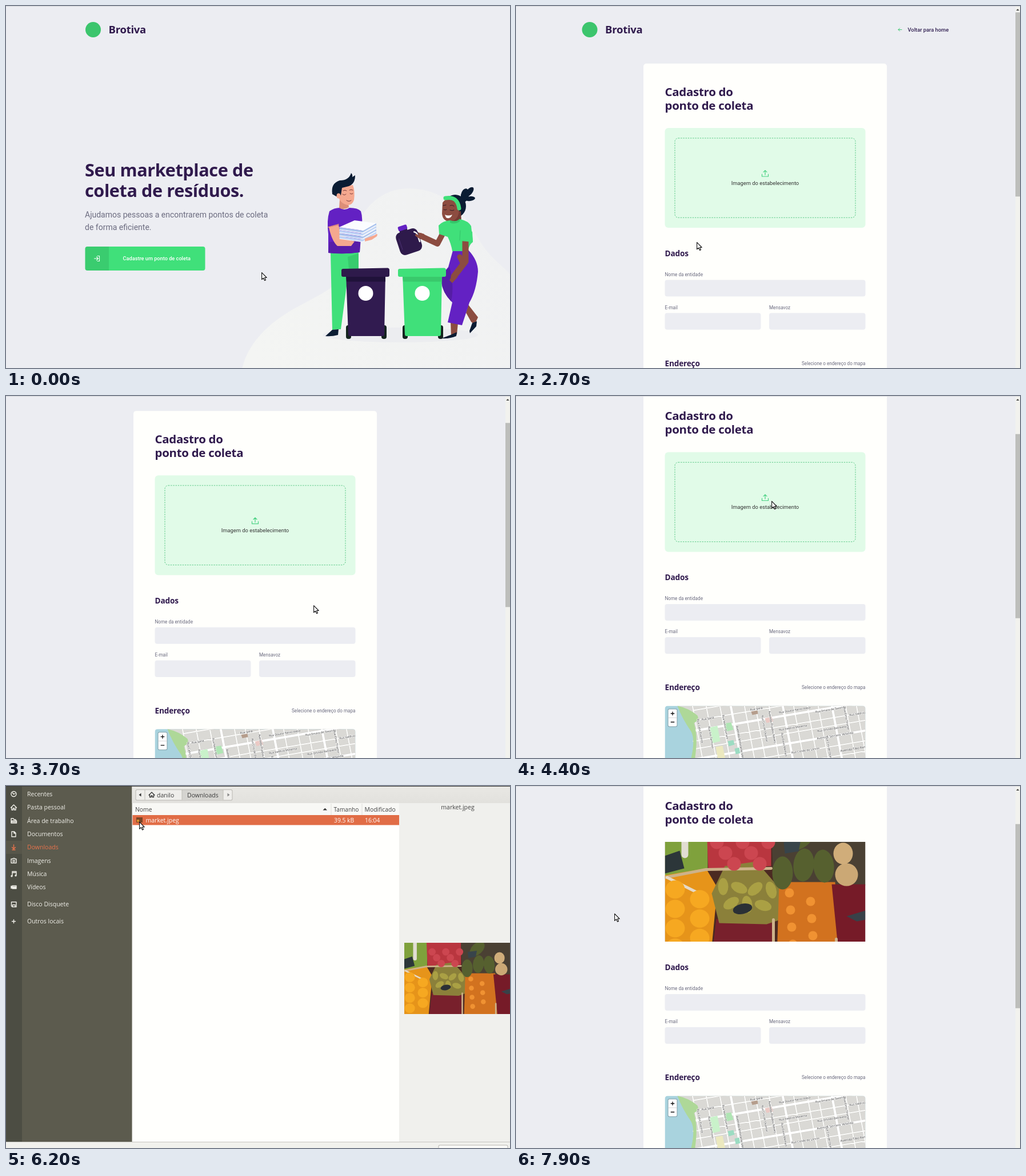
An HTML page with a canvas for the animation above (8000 ms loop, 882 px wide and 635 px high).

```html
<!DOCTYPE html>
<html lang="pt-BR">
<head>
<meta charset="utf-8">
<title>Ponto de coleta</title>
<style>
html, body { margin: 0; width: 100%; height: 100%; overflow: hidden; background: #ecedf2; }
canvas { display: block; width: 882px; height: 635px; }
</style>
</head>
<body>
<canvas id="stage" width="882" height="635"></canvas>
<script>
const W = 882, H = 635, LOOP = 8000;
const g = document.getElementById('stage').getContext('2d');
const BG = '#ecedf2', INK = '#2e1a4b', GREEN = '#40e07a', PURPLE = '#6321c3';
const NAVY = '#0b1c33', PEACH = '#f5a88f', BROWN = '#8c4c40', GREY = '#6c6c80', BRAND = 'Brotiva';
const roboto = (size, weight = 400) => `${weight} ${size}px Roboto, sans-serif`;
const ui = size => `${size}px "Open Sans", sans-serif`;

function fill(d, color) { g.fillStyle = color; g.fill(new Path2D(d)); }
function line(d, color, width = 1) {
  g.strokeStyle = color; g.lineWidth = width;
  g.lineCap = g.lineJoin = 'round';
  g.stroke(new Path2D(d));
}
function box(x, y, w, h, color, r = 0) {
  g.beginPath(); g.roundRect(x, y, w, h, r);
  g.fillStyle = color; g.fill();
}
function oval(x, y, rx, ry, color, turn = 0) {
  g.beginPath(); g.ellipse(x, y, rx, ry, turn, 0, 7);
  g.fillStyle = color; g.fill();
}
function text(s, x, y, font, color, align = 'left') {
  g.font = font; g.fillStyle = color; g.textAlign = align;
  g.fillText(s, x, y);
}
function title(s, x, y, size) {
  g.letterSpacing = -size * .0126 + 'px';
  text(s, x, y - .4, `700 ${size * .973}px "Open Sans", sans-serif`, '#301a4d');
  g.letterSpacing = '0px';
}
function at(x, y, draw) { g.save(); g.translate(x, y); draw(); g.restore(); }
function clip(w, h, r = 0) { g.beginPath(); g.roundRect(0, 0, w, h, r); g.clip(); }
const smooth = p => { p = Math.min(1, Math.max(0, p)); return p * p * (3 - 2 * p); };

function brand(x, y) {
  oval(x + 14, y, 13.5, 13.5, '#3cc56d');
  title(BRAND, x + 41, y + 7.3, 19);
}

function bin(x, body, lid, shade) {
  box(x + 8, 560, 9, 24, '#14231f', 4);
  box(x + 70, 560, 9, 24, '#14231f', 4);
  fill(`M${x + 8} 470H${x + 77}L${x + 75} 576Q${x + 75} 579 ${x + 72} 579H${x + 15}Q${x + 12} 579 ${x + 12} 576Z`, body);
  fill(`M${x + 8} 474H${x + 77}V483.5H${x + 9}Z`, shade);
  fill(`M${x + 3} 461L${x + 81} 459.5Q${x + 84} 460 ${x + 84} 463V472Q${x + 84} 475 ${x + 81} 475H${x + 3}Q${x} 475 ${x} 472V464Q${x} 461 ${x + 3} 461Z`, lid);
  oval(x + 42.5, 504, 13, 13, '#fff');
}

function man() {
  fill('M568 432L617 431L616 464L598 476L586 567L571 568Z', GREEN);
  fill('M598 440L617 434V462H600Z', '#38cc6e');
  fill('M559 579L571 568L582 567L581 577Q570 580 559 579Z', NAVY);
  fill('M566 360Q574 354 584 354Q592 360 601 354Q616 354 621 360Q625 372 622 396L619 432Q592 436 564 433V400Q561 376 566 360Z', PURPLE);
  fill('M566 414L620 409L619 432Q592 436 564 433Z', '#571da8');
  fill('M584 340L599 345L600 353Q591 359 583 354Z', '#dd8f78');
  fill('M581 318L607 314Q611 325 609 340Q606 350 597 349Q584 346 581 332Z', PEACH);
  fill('M571 330Q568 311 584 306Q600 306 604 293Q607 296 606 300L611 297Q611 312 600 316L588 319L586 332L578 334Z', NAVY);
  oval(582, 333, 3.5, 4.5, PEACH);
  line('M589 330q3 3 6 0M602 329q3 2 5 0M596 341q4 3 8 0M590 324q3-2 6 0M601 323q3-2 6 0', '#7a3b3a', 1);
  fill('M565 388L582 384L585 398L600 410L610 413L604 421L580 421Q570 412 565 388Z', PEACH);
  line('M564 388L582 383', '#e58d77', 1.5);
  for (let i = 3; i >= 0; i--) {
    const y = 388 + i * 5.2;
    fill(`M583 ${y}L625 ${y + 6}L648 ${y - 7}V${y - 3}L624 ${y + 10.5}L584 ${y + 4.5}Z`, i % 2 ? '#bed2f5' : '#a9c2ec');
    line(`M584 ${y + 4.5}L624 ${y + 10}L647 ${y - 3}`, '#f3f7ff', 1.4);
  }
  fill('M583 388L610 376L648 381L625 394Z', '#fbfcff');
  fill('M628 408L645 402Q652 397 649 404L640 410L628 413Z', PEACH);
}

function jug() {
  at(705, 413, () => {
    g.rotate(-.32);
    box(-20, -20, 40, 41, INK, 9);
    box(-10, -25, 14, 8, INK, 2);
    box(-11, -30, 16, 8, PURPLE, 2);
    line('M14 -13Q18 -11 18 -6V6', '#f2f3f2', 2.4);
    line('M-15 -10V10', '#4a2f70', 1);
  });
}

function woman() {
  fill('M809 524L826 546L820 559L814 554L805 538Z', BROWN);
  fill('M778 552L791 556L789 576L779 580Z', BROWN);
  fill('M824 553L823 562L812 574L811 570L816 556Z', NAVY);
  fill('M762 583L778 577L789 572L788 579Q777 584 762 583Z', NAVY);
  fill('M782 429L809 428Q826 446 826 466Q823 500 811 520L798 560L773 555L781 520Q764 503 762 484Q762 470 774 458Z', PURPLE);
  fill('M776 458Q785 490 779 518Q764 503 762 484Q762 470 776 458Z', '#551da5');
  line('M766 396L755 417L725 403', BROWN, 10);
  fill('M732 400L721 397L717 401L723 409L732 408Z', BROWN);
  oval(803, 332, 7, 12, NAVY, .2);
  oval(811, 326, 5, 10, NAVY, .7);
  oval(812, 338, 4, 9, NAVY, 1.45);
  oval(786, 351, 19, 20, NAVY);
  fill('M777 360L796 360L797 380Q786 385 777 378Z', '#733a33');
  fill('M764 345Q770 336 781 338Q793 344 793 358Q792 377 776 378Q764 377 763 364Z', BROWN);
  line('M769 337Q790 333 793 355', GREEN, 7);
  fill('M768 366Q774 369 781 366Q777 375 770 371Z', '#fff');
  line('M766 357q3 2 5 0M777 358q4 2 7 0M765 350l5-1M777 350q4-2 7 1', '#321b24', 1);
  fill('M757 385Q764 377 777 376Q788 380 795 374Q809 377 814 386L817 414Q811 418 808 430H781Q779 417 773 405L758 400Z', GREEN);
  fill('M777 376Q788 380 794 373L794 378Q785 384 777 380Z', '#34c56a');
  line('M804 413L804 448L784 474', BROWN, 11);
  fill('M786 464L776 481L781 486L790 476Z', BROWN);
  fill('M795 391Q806 388 816 396L817 414L795 412Z', GREEN);
  line('M795 394L794 411', '#34c56a', 1);
}

function home(hover) {
  box(0, 0, W, H, BG);
  const soft = g.createLinearGradient(430, 600, 860, 380);
  soft.addColorStop(0, '#f4f5f3');
  soft.addColorStop(1, '#f0f1f2');
  fill('M413 636C426 585 466 551 515 525C570 496 601 481 603 433C606 375 645 319 706 320C772 321 803 365 828 410C847 443 870 455 883 472V636Z', soft);
  oval(690, 577, 136, 13, '#ecedf0');
  brand(138.5, 41.5);
  title('Seu marketplace de', 138, 299, 31.5);
  title('coleta de resíduos.', 138, 335, 31.5);
  text('Ajudamos pessoas a encontrarem pontos de coleta', 138, 371, roboto(14), GREY);
  text('de forma eficiente.', 138, 392.5, roboto(14), GREY);
  const mix = (a, b) => Math.round(a + (b - a) * hover);
  box(138.5, 422, 210, 42, `rgb(${mix(64, 56)},${mix(224, 204)},${mix(122, 108)})`, 4);
  box(138.5, 422, 41.5, 42, 'rgba(0,0,0,.09)', [4, 0, 0, 4]);
  line('M154.5 443H161M158.5 440.2L161.3 443L158.5 445.8M160 438.5H163.5V447.5H160', '#fff', 1.1);
  text('Cadastre um ponto de coleta', 204.5, 446.4, roboto(9.2, 500), '#fff');
  man();
  bin(587, '#311b50', INK, '#20123a');
  woman();
  bin(686, GREEN, GREEN, '#39c96c');
  line('M794 440L800 452L783 476', BROWN, 9);
  jug();
  line('M718 402L724 406', BROWN, 4);
  box(0, 0, W, 1, '#d6d7db');
}

// Flat stand-in for the market picture, drawn in a 351 by 234 box.
function picture() {
  clip(351, 234);
  box(0, 0, 351, 234, '#4b2a22');
  fill('M0 0H75V80L0 95Z', '#7fa13c');
  fill('M73 0H186V72L76 78Z', '#b9363f');
  fill('M186 0H351V106H190Z', '#4a4033');
  fill('M0 88L72 76L92 110L80 234H0Z', '#e6941a');
  fill('M90 165H192V234H82Z', '#78202c');
  fill('M82 120L105 72L160 64L200 110L205 165L178 174L95 172Z', '#8b803a');
  fill('M200 100L298 100L306 234H196Z', '#d2721f');
  fill('M292 104H351V234H305Z', '#761b28');
  line('M0 92L72 78L186 76M190 166V234M300 200V234', '#cdb28a', 5);
  line('M4 92L60 120', '#e5dac8', 5);
  for (const [x, y, turn] of [[206, 84, 0], [243, 70, .1], [278, 72, -.1], [239, 20, .8]])
    oval(x, y, 18, 29, '#56602f', turn);
  oval(318, 87, 20, 20, '#cba875');
  oval(312, 50, 17, 19, '#d0ad7a');
  for (let i = 0; i < 7; i++) {
    oval(18 + i % 2 * 43, 113 + i * 17, 17, 16, '#f6a821');
    oval(102 + i * 14, 108 + (i * 29) % 56, 9, 15, '#aaa044', i);
    oval(218 + (i * 37) % 72, 119 + i * 15, 8, 8, '#f09232');
    oval(91 + i * 15, 30 + (i % 3) * 19, 12, 12, '#cc4650');
  }
  fill('M0 54L26 45L34 76L0 85Z', '#2c3639');
  fill('M208 30L238 26L234 46L210 50Z', '#38444a');
  oval(136, 147, 17, 9, '#2b3035', -.2);
  fill('M318 160L351 150V166L336 169Z', '#384148');
  line('M35 0V52', '#e1ddd2', 12);
}

const streets = [
  ['Rua Ipelã', 75, 22], ['Rua Ipelã', 160, 5], ['Rua Doutor Nério Valpa', 227, 7],
  ['Rua Ilmaro de Tavonde', 290, 6], ['Rua Valdirio Morenta', 347, 12],
  ['Rua Valdirio Morenta', 224, 38], ['Rua Orlindo Batravela', 292, 40],
  ['Avenida Serrano Velonda', 298, 52], ['Rua Conde de Larvim', 246, 78],
  ['Avenida Tibo Ranes', 332, 75], ['Rua Cabo Evarinte', 62, 44, 1],
  ['Rua Ivo Tarmosa', 81, 55, 1], ['Rua Nelvo Quirant', 106, 37, 1],
  ['Avenida Almirante Vero', 132, 65, 1], ['Rua Ciro de Ovantar', 175, 40, 1],
  ['Avenida Prados Neves', 188, 37, 1], ['Rua Davo Melhart', 209, 68, 1],
  ['Rua Ciro de Ovantar', 288, 76, 1], ['Rua Elmo Tirante', 318, 22, 1]
];

function map() {
  clip(351, 180, 5);
  box(0, 0, 351, 180, '#a9d3de');
  fill('M22 0Q34 24 48 40Q56 62 46 100V180H351V0Z', '#dad9d5');
  let roads = '', mains = '';
  for (let i = 0; i < 15; i++) {
    const x = 46 + i * 22 + (i * 7) % 5, part = `M${x} -12L${x + 27} 130`;
    if (i % 4 == 3) mains += part; else roads += part;
  }
  for (let i = 0; i < 9; i++) {
    const y = 8 + i * 17 + (i * 5) % 4, part = `M50 ${y}L365 ${y - 53}`;
    if (i % 3 == 2) mains += part; else roads += part;
  }
  line(roads, '#cccbc7', 2.8); line(mains, '#c8c7c3', 4.8);
  line(roads, '#fcfcfa', 2); line(mains, '#fff', 4);
  fill('M78 38L92 35L97 62L82 66Z', '#c9f2ca');
  fill('M104 31L116 29L120 42L107 45Z', '#b0e5b4');
  fill('M110 62L120 60L122 68L112 71ZM122 75L130 73L132 83L124 85Z', '#9cdcc2');
  fill('M89 72L101 70L106 94H93Z', '#ece9bf');
  fill('M151 10L162 8L163 14L153 16Z', '#b59d8c');
  fill('M175 22L187 19L190 27L178 30Z', '#ebc9c4');
  fill('M22 0Q42 4 57 17Q61 25 51 30Q59 55 52 96H45Q54 60 46 45Q30 22 22 0Z', '#aed898');
  for (const [name, x, y, down] of streets) at(x, y, () => {
    g.rotate(down ? 1.39 : -.165);
    g.font = `${name[0] == 'A' ? 5.5 : 5}px "Noto Sans", sans-serif`;
    g.textAlign = 'center';
    g.strokeStyle = 'rgba(255,255,255,.8)'; g.lineWidth = 1.3;
    g.strokeText(name, 0, 2);
    g.fillStyle = '#3b3b3b'; g.fillText(name, 0, 2);
  });
  box(5, 5, 17, 32, 'rgba(0,0,0,.25)', 3);
  box(6, 6, 15, 30, '#fff', 2);
  box(6, 20.5, 15, .8, '#ccc');
  line('M10.7 13.5H16.3M13.5 10.7V16.3M10.7 28.5H16.3', '#111', 1.3);
}

function form(scroll, chosen) {
  box(0, 0, W, H, BG);
  at(0, -scroll, () => {
    brand(115, 41.5);
    line('M669 41.5H675M671.5 39L669 41.5L671.5 44', '#40c973', 1);
    text('Voltar para home', 685.5, 44.5, roboto(9.33, 500), '#322153');
    box(223, 101, 426, 900, '#fffffc', 5);
    title('Cadastro do', 260.5, 158, 21);
    title('ponto de coleta', 260.5, 182, 21);
    if (chosen) at(260.5, 213.5, () => {
      clip(351, 175);
      g.translate(0, -29.5);
      picture();
    });
    else {
      box(260.5, 214, 351, 175, '#e1fbe8', 6);
      g.setLineDash([2.4, 1.8]);
      g.beginPath(); g.roundRect(278, 231.8, 316, 139.4, 6);
      g.strokeStyle = '#5cc987'; g.lineWidth = 1; g.lineCap = 'butt'; g.stroke();
      g.setLineDash([]);
      line('M430.5 295V299H441.5V295M436 296V288.5M433 291.3L436 288.3L439 291.3', '#4bd284', 1.2);
      text('Imagem do estabelecimento', 436, 313.7, roboto(9.33), '#333', 'center');
    }
    const label = (s, x, y, align) => text(s, x, y, roboto(8.17), GREY, align);
    title('Dados', 260.5, 439, 14);
    label('Nome da entidade', 260.5, 473.5);
    box(260.5, 480.5, 351, 29, BG, 4);
    label('E-mail', 260.5, 531.7);
    label('Mensavoz', 443, 531.7);
    box(260.5, 538.5, 168, 29.3, BG, 4);
    box(443, 538.5, 168.5, 29.3, BG, 4);
    title('Endereço', 260.5, 632, 14);
    label('Selecione o endereço do mapa', 611.5, 629.7, 'right');
    at(260.5, 659, map);
  });
  box(874, 0, 8, H, '#f2f2ee');
  box(874, 11.2 + scroll * .48, 8, 323, '#bdbebb');
  fill('M875.3 8L878 5L880.7 8Z', '#444');
  box(0, 0, W, 1, '#d6d7db');
}

const places = [
  ['Recentes', 14, 'M9 14a4.5 4.5 0 1 0 9 0a4.5 4.5 0 1 0 -9 0M11.5 12L13.5 14.5L16 13'],
  ['Pasta pessoal', 37.5, 'M8.5 38L13.5 33L18.5 38M10 37V42H12.5V39H14.5V42H17V37'],
  ['Área de trabalho', 61, 'M9 65V57H13L14 59H17V61M9 65L10.5 61H18.5V65ZM11 63H18'],
  ['Documentos', 84.5, 'M10 80H14.5L17 82.5V89H10ZM14 80V83H17'],
  ['Downloads', 107.5, 'M13.5 103V110M10.5 107.5L13.5 110.5L16.5 107.5M11 112H16'],
  ['Imagens', 131, 'M9 128H11.5L12.5 127H15L16 128H18V135H9ZM12 131.5a1.6 1.6 0 1 0 3.2 0a1.6 1.6 0 1 0 -3.2 0'],
  ['Música', 154, 'M11 158V150H18V157M11 152H18M9 158a1 1 0 1 0 2 0a1 1 0 1 0 -2 0M16 157a1 1 0 1 0 2 0a1 1 0 1 0 -2 0'],
  ['Vídeos', 177.5, 'M11 175H18V180H11ZM9 175.5L11 177.5L9 179.5ZM12 177H17M12 178.5H17'],
  ['Disco Disquete', 207.5, 'M9.5 203.5H18V212H11L9.5 210.5ZM11.5 212V208.5H16V212'],
  ['Outros locais', 237.5, 'M10.5 237.5H16.5M13.5 234.5V240.5']
];

function dialog() {
  box(0, 0, W, H, '#f0f0ed');
  box(0, 0, 220.5, 625, '#5c5b4e');
  box(0, 0, 28, 625, '#4c4d43');
  box(0, 96, 28, 23, '#57564a');
  for (const [name, y, icon] of places) {
    const color = name == 'Downloads' ? '#e8734c' : '#f1f0ea';
    line(icon, color, 1.4);
    text(name, 37, y + 3.8, ui(10.5), color);
  }
  const bar = g.createLinearGradient(0, 0, 0, 30);
  bar.addColorStop(0, '#e9e8e4');
  bar.addColorStop(1, '#e2e1dd');
  box(220.5, 0, 661.5, 30, bar);
  box(226.5, 6, 170, 19.5, '#b9b7b2', 3);
  box(227.5, 7, 168, 17.5, '#efeeeb', 2);
  box(308, 7, 72, 17.5, '#d5d4d0');
  for (const x of [243, 308, 380]) box(x - .5, 7, 1, 17.5, '#bfbdb8');
  fill('M236.5 12.5V18.5L232.5 15.5Z', '#333');
  fill('M387.5 12.5V18.5L391.5 15.5Z', '#888');
  line('M250 16L255 11L260 16M251.5 15.5V19.5H254V17H256V19.5H258.5V15.5', '#333', 1.3);
  text('danilo', 264, 19.5, ui(10.5), '#3c3c3c');
  text('Downloads', 317, 19.5, ui(10.5), '#3c3c3c');
  box(221.5, 30, 466.5, 21, '#f8f8f5');
  box(221.5, 51, 466.5, 573, '#fffffd');
  for (const x of [568.5, 622.5]) box(x, 31, 1, 20, '#deddd9');
  fill('M554.5 42.5L558.3 38.8L562 42.5Z', '#333');
  text('Nome', 226, 44.6, ui(10.4), '#444');
  text('Tamanho', 573.5, 44.6, ui(10.1), '#444');
  text('Modificado', 627.5, 44.6, ui(10.4), '#444');
  box(221.5, 51, 466.5, 17.5, '#e16d46');
  box(228, 55, 11, 9, '#7a4526');
  box(229, 59, 4, 4, '#d9902b');
  text('market.jpeg', 244.5, 63.6, ui(10.5), '#fff');
  text('39.5 kB', 574, 63.6, ui(10.3), '#fff');
  text('16:04', 628, 63.6, ui(10.3), '#fff');
  text('market.jpeg', 790.5, 41, ui(10.5), '#444', 'center');
  at(697, 275, () => { g.scale(.534, .534); picture(); });
  box(0, 624, W, 1, '#c6c5c0');
  box(0, 625, W, 10, '#f1f1ed');
  box(756.5, 629.5, 122, 20, '#b9b7b2', 3);
  box(757.5, 630.5, 120, 20, '#fafaf8', 2);
  box(0, 0, W, 1, '#3c3b37');
}

// The dialog folded almost flat, thinning towards the right.
function sliver() {
  const band = g.createLinearGradient(0, 0, W, 0);
  [[0, '#3b3a36'], [.14, '#66655c'], [.33, '#f3f2ec'], [.78, '#fffffc'], [1, '#94765c']]
    .forEach(([p, color]) => band.addColorStop(p, color));
  fill('M0 315.5H620L882 317V319L620 320.5H0Z', band);
  box(0, 315.5, W, .9, 'rgba(84,54,36,.7)');
}

// Pointer stops: time, x, y. Each holds until the next.
const stops = [
  [0, 447, 467], [800, 430, 463], [900, 390, 453], [1100, 364, 449], [1200, 328, 442],
  [1300, 306, 437], [1400, 301, 435.5], [2000, 300, 430], [2700, 316, 414], [2900, 373, 392],
  [3100, 475, 376], [3300, 538, 367], [3900, 526, 342], [4000, 500, 288], [4100, 468, 222],
  [4200, 459, 205], [4300, 451, 191], [4400, 447, 184], [5300, 422, 178], [5400, 644, 419],
  [5600, 730, 501], [5800, 390, 184], [6000, 285, 94], [6200, 233, 62.5]
];

function pointer(t) {
  let [, x, y] = stops.findLast(s => s[0] <= t);
  const drift = smooth((t - 7300) / 600);
  x += -61 * drift; y += 161 * drift;
  at(x, y, () => {
    if (t >= 1200 && t < 2000) {
      const hand = 'M-1 1Q0 -1 1.5 1V5L6 6Q8.5 6.5 8 9L7 13.5H0L-4.5 8.5Q-4.5 6.5 -2 7.5L-1 8.5Z';
      fill(hand, '#fff'); line(hand, '#111', 1.1);
      line('M2 9V11.5M4.2 9V11.5', '#111', .8);
    } else {
      const arrow = 'M.6 .7V12.8L3.4 10.2L5.6 14.6L7.5 13.7L5.5 9.5H9.2Z';
      fill(arrow, '#fff'); line(arrow, '#111', 1.1);
    }
  });
}

function draw(time) {
  const t = Math.floor(time % LOOP / 100) * 100;
  if (t < 1900) home(t < 1200 ? 0 : t < 1300 ? .5 : 1);
  else if (t >= 4900 && t < 7000) dialog();
  else {
    form(t < 3300 ? 0 : 115.5 * smooth((t - 3160) / 900), t >= 7000);
    const opening = t == 4800, closing = t == 7000 || t == 7100;
    if (opening || closing) box(0, 0, W, H, 'rgba(10,10,0,.205)');
    if (t == 7100) sliver();
    else if (opening || closing) at(0, 318, () => { g.scale(1, .5); g.translate(0, -318); dialog(); });
  }
  pointer(t);
}

function tick() {
  draw(performance.now());
  requestAnimationFrame(tick);
}
tick();
</script>
</body>
</html>
```
